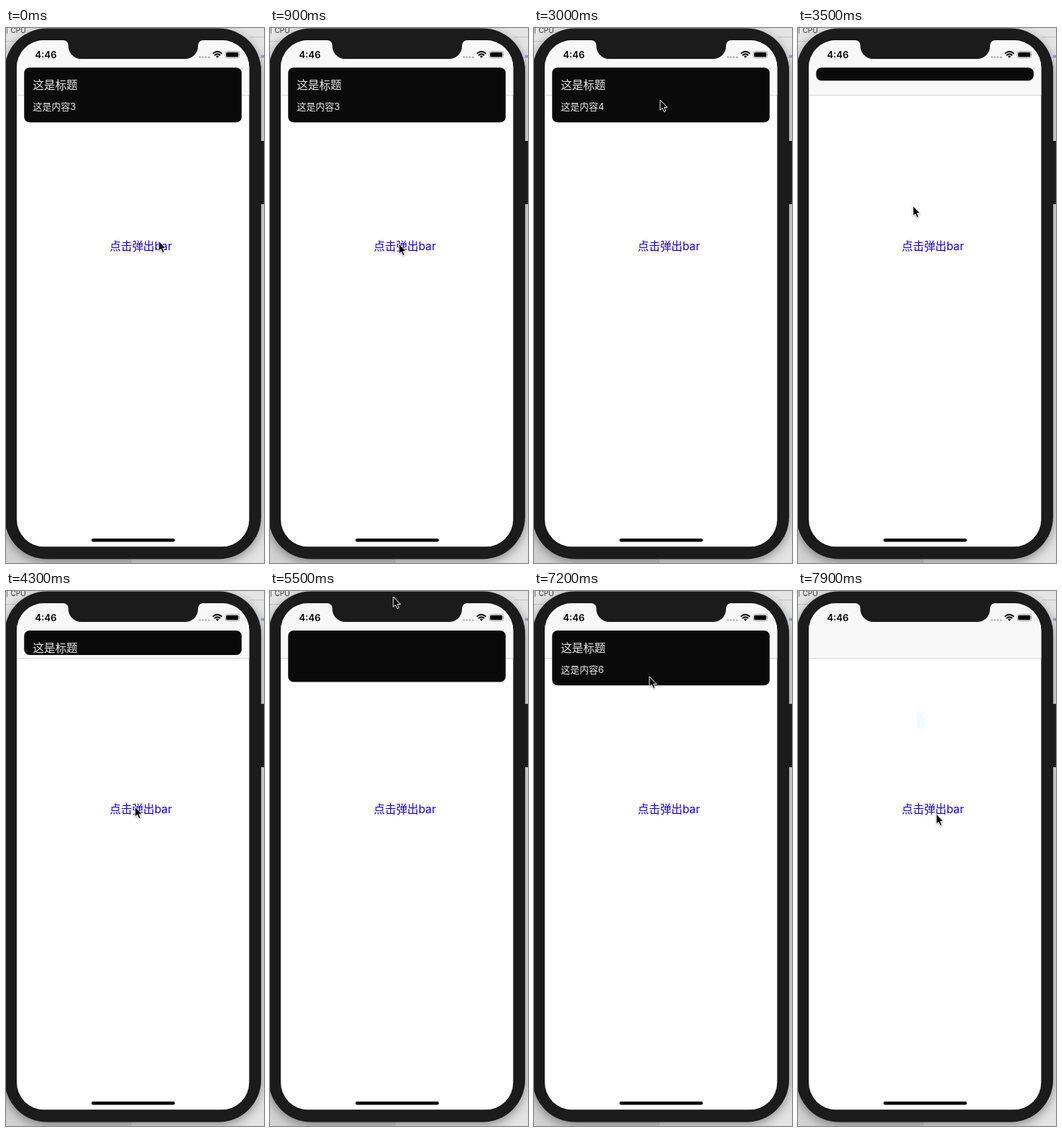
Write an HTML page that moves like this. It is 360 by 744 pixels and loops after 8000 ms.

```html
<!DOCTYPE html>
<html lang="zh-CN">
<head>
<meta charset="utf-8">
<style>
html, body { margin: 0; width: 100%; height: 100%; overflow: hidden; background: #e6e6e6; }
svg { display: block; width: 360px; height: 744px; }
text { font-family: Inter, "Noto Sans CJK SC", "Noto Sans CJK", sans-serif; }
#phone { filter: drop-shadow(0 4px 7px #0006); }
#cursor { filter: drop-shadow(0 1px 1px #0005); }
</style>
</head>
<body>
<svg viewBox="0 0 360 744">
  <defs>
    <clipPath id="screen"><rect x="15" y="17" width="324.3" height="704.3" rx="38"/></clipPath>
    <clipPath id="barClip"><rect id="barShape" x="25.3" y="55" width="303.5"/></clipPath>
  </defs>

  <!-- desktop behind the phone -->
  <rect width="360" height="744" fill="#e4e4e4"/>
  <rect y="690" width="175" height="54" fill="#d2d2d2"/>
  <path d="M0 18.5H30M340 12.5H360" stroke="#c4c4c4"/>
  <path d="M1.5 0V8" stroke="#777"/>
  <text x="6.5" y="7" font-size="10" fill="#333">CPU</text>
  <path d="M356 39.5H360" stroke="#8f9fe0" stroke-width="4"/>
  <rect x="350" y="157" width="10" height="88" fill="#222"/>

  <!-- phone -->
  <rect id="phone" x="-2" y=".5" width="358" height="738" rx="59" fill="#1b1b1b"/>
  <g clip-path="url(#screen)">
    <rect x="15" y="17" width="325" height="705" fill="#fff"/>
    <rect x="15" y="17" width="325" height="76.5" fill="#f8f8f8"/>
    <path d="M15 93.5H340" stroke="#d2d2d2" stroke-width=".9"/>
    <path d="M80 16V17A7 7 0 0 1 87 24V25A18 18 0 0 0 105 43H250A18 18 0 0 0 268 25V24A7 7 0 0 1 275 17V16Z" fill="#1b1b1b"/>
  </g>
  <text x="40.5" y="41.5" font-size="13.2" font-weight="600">4:46</text>
  <path d="M270.6 40.4H284" stroke="#b9b9b9" stroke-width="3" stroke-linecap="round" stroke-dasharray="0 4.2"/>
  <path d="M288.6 35.6Q295 29.8 301.4 35.6M290.9 38Q295 34.4 299.1 38" fill="none" stroke="#000" stroke-width="1.9"/>
  <path d="M292.9 39.4Q295 37.8 297.1 39.4L295 41.8Z"/>
  <rect x="305.9" y="32.4" width="19.6" height="9.2" rx="2.6" fill="none" stroke="#a5a5a5" stroke-width=".9"/>
  <rect x="307.2" y="33.7" width="17" height="6.6" rx="1.5"/>
  <path d="M326.6 35.4Q328 37 326.6 38.6Z" fill="#a5a5a5"/>
  <rect x="119.3" y="710" width="116.3" height="4.4" rx="2.2"/>

  <path id="smear" d="M165 165L172 172L177 176V186L173 192L167 190Z" fill="#effbfc"/>
  <text x="144.8" y="309" font-size="15.6" fill="#1600d2">点击弹出bar</text>

  <!-- notification bar -->
  <g clip-path="url(#barClip)">
    <rect x="25" y="55" width="304" height="77" fill="#0a0a0a"/>
    <g id="barText" fill="#ececec">
      <text x="37.5" y="85" font-size="15.6">这是标题</text>
      <text id="content" x="37.5" y="113.5" font-size="13"></text>
    </g>
  </g>

  <path id="cursor" d="M0 0V14.2L3.2 11.3L5.5 16.6L8 15.5L5.7 10.4H10Z" stroke="#fff" stroke-linejoin="round"/>
</svg>
<script>
const LOOP = 8000, STEP = 100, FULL = 76.2, SLIDE = 220;
const $ = id => document.getElementById(id);

// The pointer leaves the button, rests on the bar, flicks it up and returns to the next button spot.
const start = { x: 213, y: 296 };
const rounds = [
  { opens: -1000, leaves: 2600, closes: 3350, back: 140, button: { x: 180, y: 300 }, bar: { x: 176, y: 100 }, top: 34 },
  { opens: 4198, leaves: 4400, closes: 5467, back: 900, button: { x: 180, y: 300 }, bar: { x: 176, y: 110 }, top: 8 },
  { opens: 6498, leaves: 6600, closes: 7360, back: 450, button: { x: 193, y: 299 }, bar: { x: 161, y: 119 }, top: 52 }
];
const finish = { x: 193, y: 310 };

const ease = v => v * v * (3 - 2 * v);
const progress = (t, from, length) => ease(Math.max(0, Math.min(1, (t - from) / length)));

// Eased move from a to b, bowed sideways by (bx, by) at its middle.
function glide(a, b, k, bx = 0, by = 0) {
  const bow = Math.sin(Math.PI * k);
  return { x: a.x + (b.x - a.x) * k + bx * bow, y: a.y + (b.y - a.y) * k + by * bow };
}

function pointer(t) {
  if (t < 900) return glide(start, rounds[0].button, progress(t, 200, 700), -80, 85);
  const i = Math.max(0, rounds.findLastIndex(r => t >= r.leaves));
  const { leaves, closes, back, button, bar, top } = rounds[i];
  const home = i + 1 < rounds.length ? rounds[i + 1].button : finish;
  const peak = { x: bar.x - 4 * i % 8, y: top };
  if (t < closes - 100) return glide(button, bar, progress(t, leaves, 400));
  if (t < closes + 50) return glide(bar, peak, progress(t, closes - 100, 133));
  return glide(peak, home, progress(t, closes + 50, back), -32);
}

function draw(t) {
  const i = rounds.findLastIndex(r => t >= r.opens);
  const { opens, closes } = rounds[i];
  const height = FULL * (progress(t, opens, SLIDE) - progress(t, closes, SLIDE));
  $('barShape').setAttribute('height', height);
  $('barShape').setAttribute('rx', Math.min(7.5, height / 2));
  $('barText').style.display = t < closes ? '' : 'none';
  $('content').textContent = '这是内容' + (t < 1600 ? 3 : 4 + i);
  $('smear').style.display = t >= 7600 ? '' : 'none';
  const { x, y } = pointer(t);
  $('cursor').setAttribute('transform', `translate(${x} ${y})`);
}

const begin = performance.now();
function tick() {
  const t = (performance.now() - begin) % LOOP;
  draw(Math.floor(t / STEP) * STEP);
  requestAnimationFrame(tick);
}
tick();
</script>
</body>
</html>
```
